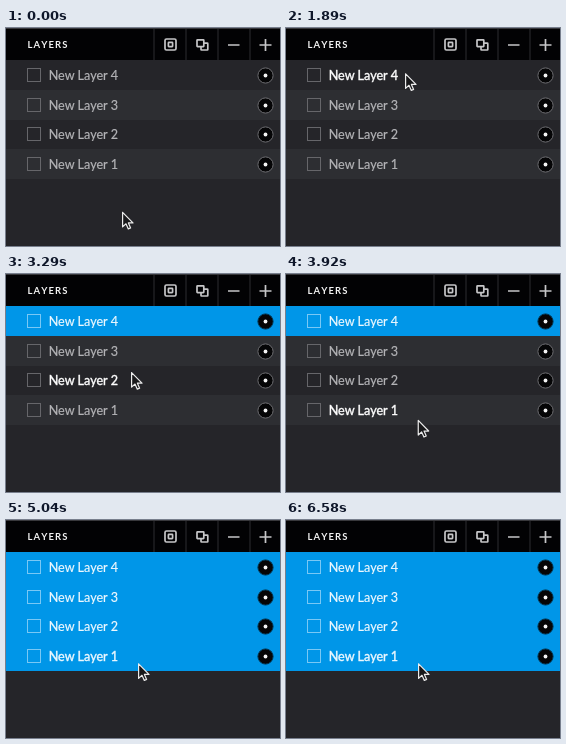
Animation, 274 px wide and 218 px high, one loop 6650 ms. Source, as an HTML page:

```html
<!DOCTYPE html>
<html lang="en">
<head>
<meta charset="utf-8">
<title>Layers panel</title>
<style>
  html, body { margin: 0; width: 100%; height: 100%; overflow: hidden; background: #252529; }
  svg { display: block; width: 100vw; height: 100vh; }
  text { font-family: Lato, "Open Sans", sans-serif; }
  .title { font-size: 9.5px; font-weight: 700; letter-spacing: 1.1px; font-kerning: none; fill: #f2f2f2; }
  .icon { fill: #020204; stroke: #c6c6c8; stroke-width: 1.7; }
  .row text { font-size: 12.6px; fill: #b4b4b7; stroke: #b4b4b7; stroke-width: .2px; }
  .row .bg { fill: #252529; shape-rendering: crispEdges; }
  .row.alt .bg { fill: #2d2e32; }
  .row .box { fill: none; stroke: #66666a; }
  .row .ring { fill: #050506; stroke: #6c6c70; }
  .row .dot { fill: #f4f4f4; }
  .row.hover text { fill: #fff; stroke: #fff; stroke-width: .4px; }
  .row.on .bg { fill: #0096e8; }
  .row.on text { fill: #eef8fe; stroke: #eef8fe; }
  .row.on .box { stroke: #79c8f5; }
  .row.on .ring { stroke: #04344f; }
</style>
</head>
<body>
<svg viewBox="0 0 274 218" preserveAspectRatio="none">
  <rect width="274" height="218" fill="#252529"/>
  <rect width="274" height="32" fill="#020204"/>
  <text class="title" x="21.5" y="20.2">LAYERS</text>
  <path d="M148 1V32M180 1V32M212 1V32M244 1V32" stroke="#2c2c30"/>
  <g class="icon">
    <rect x="159" y="11" width="11" height="11" rx="1.5"/>
    <rect x="162.4" y="14.4" width="4.2" height="4.2" rx=".5"/>
    <rect x="195" y="15.2" width="6.8" height="6.8" rx=".5"/>
    <rect x="191" y="11.8" width="6.8" height="6.8" rx=".5"/>
    <path d="M222 17H233.5M253.5 17H265.5M259.5 11V23"/>
  </g>
  <g id="rows"></g>
  <path d="M0 .5H274" stroke="#38383c"/>
  <path id="cursor" d="M.6 .8V15.4L4 12.3L6.3 17.4L8.6 16.4L6.4 11.4H11Z"
        fill="#18181a" stroke="#ececec" stroke-width="1.2" stroke-linejoin="round"/>
</svg>
<script>
const LOOP = 6650, STEP = 70;
const TOP = 32, PITCH = 29.8;
const CLICK = 2100, SHIFT_CLICK = 4970;

// Pointer moves: up to the first row, down past the last, settle back
const HOME = { x: 116, y: 183.5 };
const MOVES = [
  { from: 560, to: 1480, dx: 3, dy: -138.5, bow: -3.6 },
  { from: 2870, to: 3710, dx: 12, dy: 105.5, bow: 0 },
  { from: 3710, to: 4060, dx: 1, dy: -7.5, bow: 0 }
];

const rowTop = i => Math.round(TOP + i * PITCH);

const rowMarkup = i => {
  const mid = Math.round(47 + i * 29.6);
  return `<g class="row${i % 2 ? ' alt' : ''}">
    <rect class="bg" y="${rowTop(i)}" width="274" height="${rowTop(i + 1) - rowTop(i)}"/>
    <rect class="box" x="21.5" y="${mid - 6.5}" width="13" height="13"/>
    <text x="42.7" y="${mid + 4.5}">New Layer ${4 - i}</text>
    <circle class="ring" cx="259.5" cy="${mid + .5}" r="7.6"/>
    <circle class="dot" cx="259.5" cy="${mid + .5}" r="1.9"/>
  </g>`;
};

const list = document.getElementById('rows');
list.innerHTML = [0, 1, 2, 3].map(rowMarkup).join('');
const rows = [...list.children];
const cursor = document.getElementById('cursor');

const smooth = u => u * u * (3 - 2 * u);

function pointerAt(t) {
  let { x, y } = HOME;
  for (const m of MOVES) {
    const u = Math.min(1, Math.max(0, (t - m.from) / (m.to - m.from)));
    x += m.dx * smooth(u) + m.bow * Math.sin(Math.PI * u);
    y += m.dy * smooth(u);
  }
  return [x, y];
}

function draw(now) {
  const t = Math.floor((now % LOOP) / STEP) * STEP;
  const [x, y] = pointerAt(t);
  const over = Math.floor((y - TOP) / PITCH);
  cursor.setAttribute('transform', `translate(${x} ${y})`);
  rows.forEach((row, i) => {
    row.classList.toggle('hover', i === over);
    row.classList.toggle('on', t >= (i ? SHIFT_CLICK : CLICK));
  });
}

let start;
function tick(now) {
  start ??= now;
  draw(now - start);
  requestAnimationFrame(tick);
}
draw(0);
requestAnimationFrame(tick);
</script>
</body>
</html>
```
